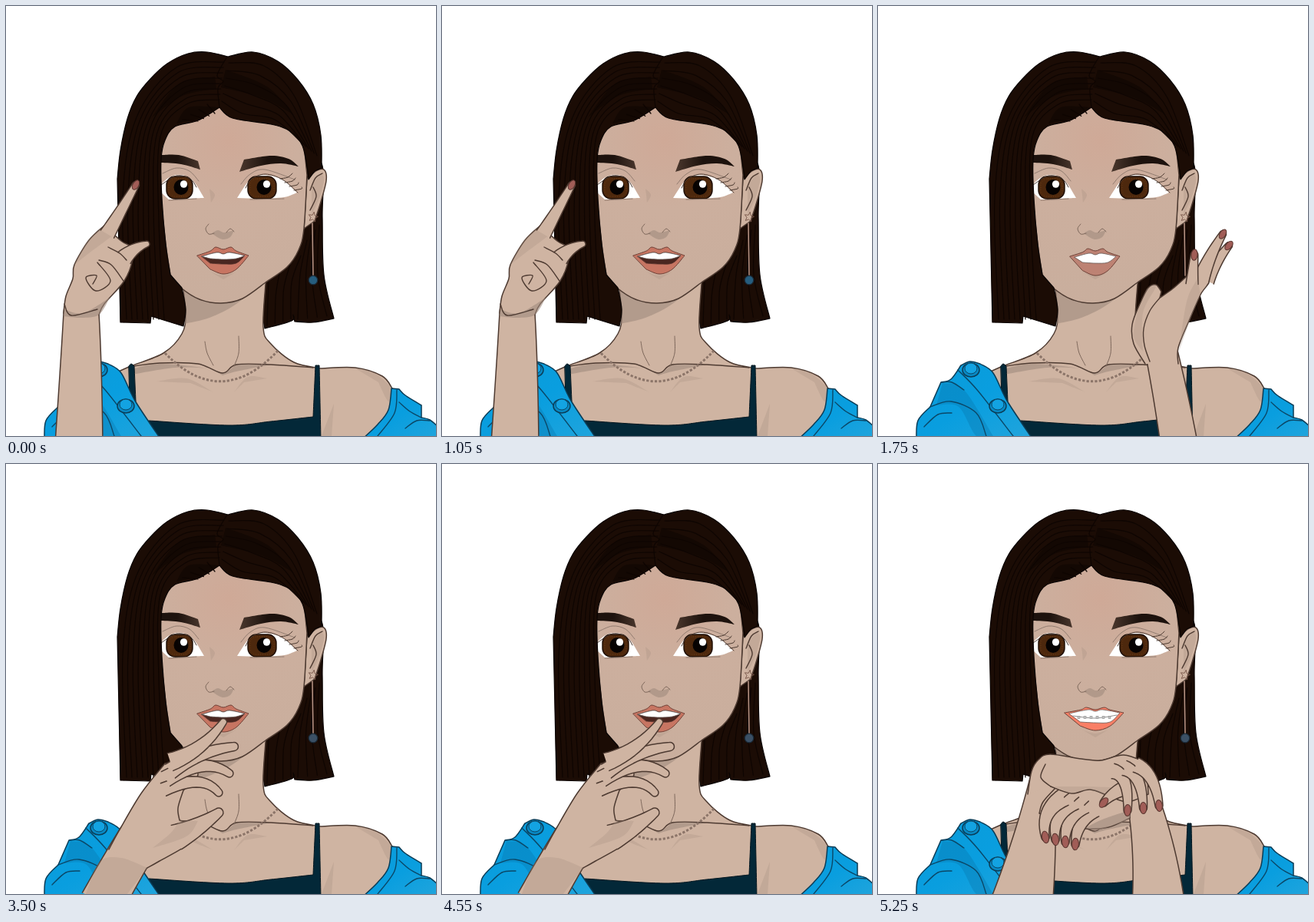
Animation of 560x560 px, one loop 7 s. Source, as an HTML page:

```html
<!DOCTYPE html>
<html lang="en">
<head>
<meta charset="utf-8">
<title>Portrait poses</title>
<style>
html, body { margin: 0; width: 100%; height: 100%; overflow: hidden; background: #fff; }
svg { display: block; width: 560px; height: 560px; }
path { fill: none; stroke-linecap: round; stroke-linejoin: round; }
.skin { fill: #cfb4a2; stroke: #4d3a31; stroke-width: 1.5; }
.face { fill: url(#face); stroke: #4d3a31; stroke-width: 1.5; }
.shade { fill: #a08b7d; opacity: .6; }
.soft { fill: #a08b7d; opacity: .28; }
.line { stroke: #4d3a31; stroke-width: 1.4; }
.thin { stroke: #7d675b; stroke-width: 1; }
.hair { fill: #1b0c05; stroke: #090301; stroke-width: 1.2; }
.strand { stroke: #0e0502; stroke-width: 1.2; }
.lock { fill: #130803; }
.shirt { fill: url(#shirt); stroke: #0b3c56; stroke-width: 1.5; }
.fold { stroke: #0b4767; stroke-width: 1.4; }
.dip { fill: #0878ae; opacity: .4; }
.top { fill: #032838; stroke: #02151e; }
.white { fill: #fff; }
.brow { fill: url(#brow); }
.lash { stroke: #4a382f; stroke-width: 1; }
.lid { stroke: #927c70; stroke-width: 1; }
.chain { stroke: #8b7468; stroke-width: 3; stroke-dasharray: 3.2 2.2; stroke-linecap: butt; }
.drop { stroke: #bb9788; stroke-width: 1.5; }
.gap { fill: #4a2620; stroke: #51302a; stroke-width: .8; }
.teeth { fill: #fff; stroke: #655a56; stroke-width: .8; }
.wire { stroke: #8e8e8e; stroke-width: 1; }
</style>
</head>
<body>
<svg viewBox="0 0 560 560">
<defs>
<radialGradient id="face" gradientUnits="userSpaceOnUse" cx="290" cy="175" r="215">
<stop offset="0" stop-color="#cfa997"/><stop offset=".42" stop-color="#ccaf9e"/><stop offset="1" stop-color="#c9ae9d"/>
</radialGradient>
<linearGradient id="shirt" x1="0" y1="0" x2="1" y2="1">
<stop offset="0" stop-color="#0a9bd9"/><stop offset=".5" stop-color="#099edf"/><stop offset="1" stop-color="#22a5dc"/>
</linearGradient>
<linearGradient id="brow" gradientUnits="userSpaceOnUse" x1="202" y1="0" x2="340" y2="0">
<stop offset=".15" stop-color="#1d120d"/><stop offset=".38" stop-color="#4a372d"/>
<stop offset=".74" stop-color="#4a372d"/><stop offset="1" stop-color="#1d120d"/>
</linearGradient>
</defs>
</svg>
<script>
const NS = 'http://www.w3.org/2000/svg';
const LOOP = 7000, POSES = 4;
const svg = document.querySelector('svg');
let layer = svg;

function add(tag, attrs) {
  const el = document.createElementNS(NS, tag);
  for (const k in attrs) el.setAttribute(k, attrs[k]);
  layer.appendChild(el);
  return el;
}

const points = text => text.trim().split(/\s+/).map(s => s.split(',').map(Number));

// Smooth path through points; "|" marks a corner.
function smooth(text) {
  let d = '', last = null;
  for (const run of text.split('|')) {
    const p = points(run);
    if (last) p.unshift(last); else d = 'M' + p[0];
    for (let i = 0; i < p.length - 1; i++) {
      const b = p[i], c = p[i + 1], a = p[i - 1] || b, e = p[i + 2] || c;
      d += `C${[0, 1].map(k => b[k] + (c[k] - a[k]) / 6)} ${[0, 1].map(k => c[k] - (e[k] - b[k]) / 6)} ${c}`;
    }
    last = p[p.length - 1];
  }
  return d;
}
const shape = (cls, pts) => add('path', { class: cls, d: smooth(pts) + 'Z' });
const lines = (cls, ...list) => list.forEach(pts => add('path', { class: cls, d: smooth(pts) }));
const oval = (cx, cy, rx, ry, fill, more) => add('ellipse', { cx, cy, rx, ry, fill, ...more });

// Strands blended between two guide curves.
function strands(from, to, n) {
  const a = points(from), b = points(to);
  for (let i = 0; i < n; i++) {
    const t = i / (n - 1);
    lines('strand', a.map((p, j) => p.map((v, k) => v + (b[j][k] - v) * t)).join(' '));
  }
}

// Tapering arm or finger along a quadratic curve: start, bend, tip.
function limb(text, r0, r1, nail) {
  const [a, b, c] = points(text), left = [], right = [], steps = 12;
  let dir;
  for (let i = 0; i <= steps; i++) {
    const t = i / steps, u = 1 - t, r = r0 + (r1 - r0) * t;
    const [x, y] = [0, 1].map(k => u * u * a[k] + 2 * u * t * b[k] + t * t * c[k]);
    const [dx, dy] = [0, 1].map(k => u * (b[k] - a[k]) + t * (c[k] - b[k]));
    dir = Math.atan2(dy, dx);
    const ox = Math.sin(dir) * r, oy = -Math.cos(dir) * r;
    left.push([x + ox, y + oy]);
    right.unshift([x - ox, y - oy]);
  }
  add('path', { class: 'skin', d: `M${left.join('L')}A${r1} ${r1} 0 0 1 ${right.join('L')}` });
  if (nail) oval(c[0], c[1], r1 * .85, r1 * 1.5, '#a15d57',
    { stroke: '#59352f', transform: `rotate(${dir * 180 / Math.PI + 90} ${c})` });
}

// Group that is visible only in the listed poses.
function during(poses, draw) {
  const g = layer = add('g', {});
  draw();
  layer = svg;
  const steps = [];
  for (let i = 0; i <= POSES; i++)
    steps.push({ offset: i / POSES, opacity: poses.includes(i % POSES) ? 1 : 0, easing: 'step-end' });
  g.animate(steps, { duration: LOOP, iterations: Infinity }).startTime = 0;
}

function body() {
  shape('hair', '380,200 | 411,205 412,275 414,350 427,407 | 400,412 376,411 | 374,402 | 372,410 337,420 | 325,350');
  strands('342,360 341,385 340,416', '384,325 372,360 371,408', 4);
  strands('392,305 383,350 380,408', '408,285 406,350 418,404', 4);
  shape('skin', '229,355 | 234,400 229,427 205,452 160,470 130,484 | 200,570 | 500,570 | 503,498 | 490,482 455,471 410,472 | 375,464 345,440 335,418 339,350');
  shape('shade', '230,365 | 234,395 232,414 | 265,406 300,388 338,357');
  shape('shade', '160,474 200,466 266,472 | 220,471 164,480');
  shape('shade', '258,467 281,478 300,467 | 345,467 | 300,476 282,481');
  shape('soft', '196,489 235,485 270,503 | 240,491');
  shape('soft', '340,485 315,483 297,503 | 310,490');
  shape('soft', '455,472 480,478 503,498 | 498,515 485,490');
  shape('soft', '427,518 | 424,560 | 411,560');
  lines('line', '160,470 200,465 250,466 282,478 300,467 345,467 400,471');
  lines('thin', '259,437 262,452 270,468', '303,430 303,452 297,469');
  add('path', { class: 'chain', d: 'M207,452Q280,527 354,449' });
  shape('top', '160,469 | 163,466 167,469 | 169,515 | 161,505');
  shape('top', '186,540 290,546 345,541 400,535 | 403,468 | 408,468 | 410,565 | 186,565');
}

function shirt() {
  shape('shirt', '50,565 52,540 68,522 | 82,490 | 95,486 108,468 | 120,463 133,466 | 150,478 168,514 202,565');
  shape('dip', '84,491 112,500 150,560 | 128,560 105,522 76,520');
  lines('fold', '104,474 130,501 176,560', '83,490 96,490 112,500', '68,522 95,515 128,530 141,560', '60,548 78,532 96,530');
  for (const [x, y] of [[121, 473], [156, 520]]) {
    oval(x, y + 1, 11, 9, '#0889c4', { stroke: '#0b3c56', 'stroke-width': 1.4 });
    oval(x, y - 1, 8, 7, '#13a3e2', { stroke: '#0b4767' });
  }
  shape('shirt', '502,498 512,499 | 520,507 541,520 | 541,536 | 552,539 565,550 | 565,565 | 463,565 | 484,545 498,526 502,498');
  lines('fold', '509,500 506,530 484,560', '541,536 526,528 512,516', '552,540 535,540 520,550');
}

function eye(x, w, pupil) {
  add('rect', { x, y: 222, width: w, height: 29, rx: 11, fill: '#4d280d', stroke: '#1d0d04', 'stroke-width': 1.4 });
  add('rect', { x: x + 3, y: 225, width: w - 6, height: 23, rx: 9, fill: 'none', stroke: '#693a15', 'stroke-dasharray': '1 2' });
  oval(pupil, 236, 9.5, 10, '#070302');
  oval(pupil + 3.5, 232, 4.6, 4.8, '#fff');
}

function head() {
  shape('skin', '392,225 405,214 415,214 417,228 410,255 402,280 | 388,290');
  shape('soft', '398,235 409,220 414,226 408,250 398,272');
  lines('line', '396,240 403,224 412,218', '400,236 404,248 396,266');
  shape('face', '200,180 | 202,250 208,310 214,350 | 228,367 252,382 280,387 308,381 338,360 | 366,340 381,318 388,290 392,220 | 385,150 | 280,120 | 215,140');
  shape('soft', '266,346 283,351 300,346 | 283,356');

  shape('white', '202,243 204,230 222,220 242,226 258,250 | 235,251 212,252');
  shape('white', '301,250 318,226 336,220 360,226 379,243 | 362,249 330,251');
  eye(209, 34, 228);
  eye(315, 37, 336);
  lines('lash', '202,233 222,221 240,225 248,236', '312,237 320,225 338,219 360,226 380,243');
  lines('lid', '204,218 222,211 239,215 251,228', '306,232 318,219 337,213 376,226', '212,253 248,251', '318,252 362,251');
  for (let i = 0; i < 4; i++) {
    const x = 357 + 6 * i, y = 225 + 5 * i;
    lines('lash', `${x},${y} ${x + 10},${y - 2} ${x + 16 - 2 * i},${y - 7 + i}`);
  }
  shape('brow', '202,194 225,194 250,202 | 253,213 | 228,206 202,204');
  shape('brow', '304,216 | 310,200 | 345,195 368,199 381,209 | 358,205 332,208 304,216');

  shape('soft', '265,238 272,246 267,256 | 266,246');
  shape('shade', '268,296 276,292 284,295 297,292 | 292,301 283,304 275,301');
  lines('thin', '264,284 260,290 264,297 271,296', '287,295 292,290 297,294');

  shape('hair', '289,66 | 262,60 237,62 210,75 188,95 170,118 158,147 149,188 145,225 | 149,412 | 188,413 | 189,404 | 231,417 | 234,395 229,367 | 214,350 | 208,310 203,250 202,200 207,175 220,157 250,149 278,132 | 295,146 345,154 370,163 386,182 393,215 | 394,226 | 402,215 | 411,211 | 410,168 400,128 380,96 354,72 322,60 289,66');
  shape('lock', '272,92 225,102 190,145 | 230,117 274,108');
  shape('lock', '286,83 340,105 375,142 | 335,120 280,106');
  shape('lock', '222,153 238,132 278,132 | 250,148');
  strands('284,73 222,80 170,145 152,250 157,408', '278,122 235,128 201,170 199,280 206,408', 8);
  strands('290,74 336,78 376,118 405,195', '281,124 308,140 350,148 387,180', 6);
  strands('230,148 250,150', '262,128 272,140', 4);
  lines('strand', '288,66 275,90 283,98 276,107 278,132');

  const star = [];
  for (let i = 0; i < 10; i++) {
    const r = i % 2 ? 3 : 6.5, a = i * Math.PI / 5 + .2;
    star.push([400 + r * Math.sin(a), 275 - r * Math.cos(a)]);
  }
  add('path', { d: `M${star.join('L')}Z`, fill: '#d0aa99', stroke: '#765548', 'stroke-width': .9 });
  lines('drop', '399,283 400,351');
}

const ball = fill => oval(400, 357, 5.8, 5.8, fill, { stroke: '#1b2c3a', 'stroke-width': 1.3 });

// Lips from corner to corner; bow rises above y, depth hangs below.
function mouth(color, l, r, y, bow, depth, gap, bite) {
  const c = 283, q = (r - l) / 4;
  const inner = (cls, drop) => shape(cls,
    `${l + 6},${y + 1} ${c - q / 2},${y - 4} ${c},${y - 2} ${c + q / 2},${y - 4} ${r - 5},${y} | ${c + q},${y + drop - 1} ${c},${y + drop} ${c - q},${y + drop - 1}`);
  const lip = shape('lip', `${l},${y} ${c - q},${y - bow * .55} ${c - q * .6},${y - bow} ${c},${y - bow + 3} ${c + q * .6},${y - bow} ${c + q},${y - bow * .55} ${r},${y} | ${c + q},${y + depth * .75} ${c},${y + depth} ${c - q},${y + depth * .75}`);
  lip.setAttribute('fill', color);
  lip.setAttribute('style', `fill:${color};stroke:#6d4036`);
  if (gap > bite) inner('gap', gap);
  inner('teeth', bite);
}

function braces() {
  lines('wire', '254,328 283,331 311,327');
  for (let x = 260; x < 308; x += 8)
    add('rect', { x, y: 328.5, width: 3, height: 3, fill: '#c4c4c4', stroke: '#8e8e8e', 'stroke-width': .6 });
}

function pinch() {
  limb('95,570 98,470 98,400', 31, 23);
  lines('skin', '75,400 78,378 87,355 89,337 108,305 128,286 | 150,306 163,314 165,330 154,358 128,388 121,402');
  shape('soft', '128,286 106,306 89,337 | 108,322 139,299');
  shape('shade', '76,395 100,400 135,380 | 121,402 98,406 75,404');
  limb('132,297 148,270 169,233', 10, 4.5, true);
  limb('154,328 166,315 183,310', 11, 4);
  lines('line', '133,314 148,322 157,331', '121,331 137,337 153,358', '119,334 136,358 117,371 104,354 118,351 113,362', '76,388 85,403 119,395');
}

function sidePalm() {
  limb('392,570 382,510 370,455', 24, 21);
  lines('skin', '348,466 333,440 331,415 341,388 352,367 362,363 369,372 | 367,380 | 384,368 402,352 | 430,358 420,376 405,410 391,445 391,466');
  limb('428,358 438,335 457,312', 10, 4.5, true);
  limb('420,358 430,328 449,297', 11, 4.5, true);
  limb('409,362 410,345 412,324', 8, 4.8, true);
  shape('soft', '416,355 402,385 392,450 | 408,405 420,376');
  shape('soft', '350,368 362,365 345,400 345,450 | 333,430 338,398');
  lines('line', '367,380 354,397 346,420 347,442 354,463');
}

function fingerToLip() {
  limb('125,572 145,535 172,490', 29, 28);
  lines('skin', '134,502 147,478 176,429 207,390 | 240,385 | 250,405 231,425 | 224,448 226,464 | 245,472 240,493 200,517 184,526');
  limb('222,486 250,474 277,454', 17, 6);
  limb('205,424 256,402 277,428', 9, 5);
  limb('208,410 258,380 291,403', 11, 5);
  limb('214,400 250,374 297,368', 11, 5.5);
  limb('214,388 256,374 283,336', 12, 4.5);
  shape('soft', '104,560 122,518 150,513 184,526 | 158,560');
  shape('soft', '226,464 215,480 191,500 | 235,485 250,465');
}

function chinRest() {
  limb('365,570 362,505 346,440', 34, 21);
  limb('188,570 206,490 214,410', 40, 16);
  shape('skin', '232,421 215,440 210,455 | 250,470 | 271,475 300,473 328,461 | 330,425');
  shape('shade', '270,474 292,463 327,451 | 327,462 302,472 283,478');
  for (let i = 3; i >= 0; i--) {
    const x = 218 + 13 * i, y = 486 + 3 * i;
    limb(`${x + 24},${434 + 5 * i} ${x - 7 + 3 * i},${452 + 4 * i} ${x},${y}`, 12, 5.2, true);
  }
  lines('skin', '195,430 200,400 209,385 224,378 265,384 290,386 320,379 350,389 | 352,430 | 325,440 300,432 276,424 252,429 225,420');
  shape('soft', '228,420 265,420 303,421 | 300,432 276,424 252,429');
  limb('322,422 305,428 294,441', 10, 5, true);
  for (let i = 0; i < 3; i++)
    limb(`${306 + 15 * i},${400 - 4 * i} ${327 + 17 * i},${404 - i} ${325 + 20.5 * i},${451 - 3 * i}`, 10, 5, true);
  lines('line', '225,420 212,408 218,391');
}

body();
shirt();
head();
during([0], () => ball('#265d7e'));
during([2, 3], () => ball('#3b5065'));
during([0, 2], () => mouth('#c77562', 249, 316, 325, 11, 24, 11, 5));
during([1], () => mouth('#bd8273', 250, 315, 326, 10, 25, 9, 9));
during([3], () => { mouth('#f97f66', 243, 320, 324, 7, 23, 13, 13); braces(); });
[pinch, sidePalm, fingerToLip, chinRest].forEach((draw, i) => during([i], draw));
</script>
</body>
</html>
```
